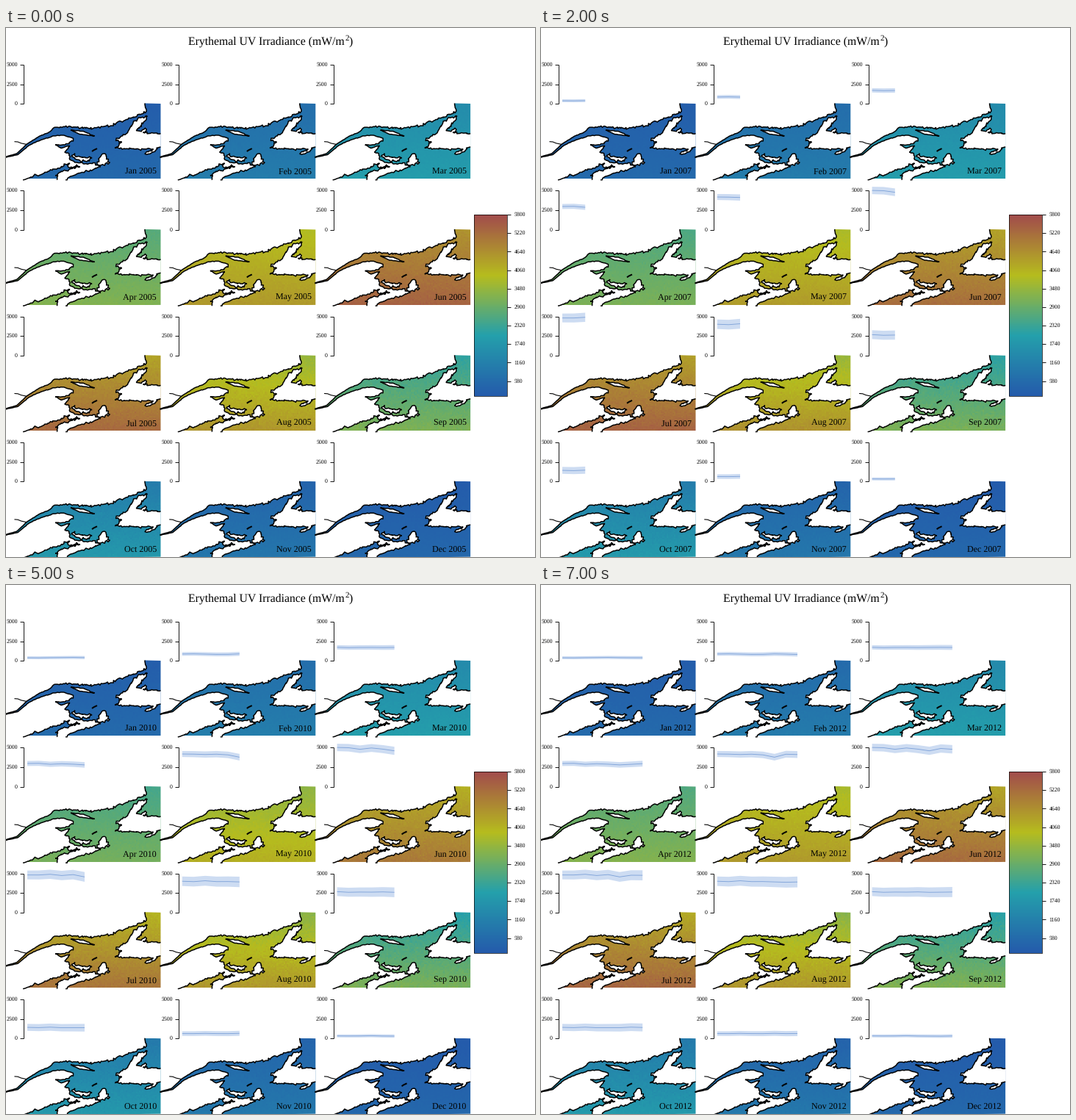
These frames come from a looping animation (720x720 px, 8 s). A matplotlib script:

```python
import numpy as np
import matplotlib.pyplot as plt
from matplotlib.animation import FuncAnimation
from matplotlib.colors import LinearSegmentedColormap, Normalize
from matplotlib.patches import PathPatch, Polygon, Rectangle
from matplotlib.path import Path

plt.rcParams["font.family"] = "Liberation Serif"
plt.rcParams["text.hinting"] = "none"

SIZE = 720
YEARS = np.arange(2005, 2013)
MONTHS = "Jan Feb Mar Apr May Jun Jul Aug Sep Oct Nov Dec".split()
COL_STEP, ROW_STEP = 210.8, 171.4
RIGHT, TOP, BOTTOM = 210.5, 103, 205.5
ZERO_Y, PX_PER_UNIT = 102.6, 53.2 / 5000

ramp = [(36, 91, 171), (36, 160, 172), (182, 188, 30), (162, 76, 76)]
cmap = LinearSegmentedColormap.from_list("uv", np.array(ramp) / 255)
norm = Normalize(100, 5800)
rng = np.random.default_rng(5)


def wave(month, peak, period=12):
    return np.cos(2 * np.pi * (month - peak) / period)


def irradiance():
    """Mean and spread by month and year: a seasonal cycle with small
    random anomalies and one cloudy spring."""
    m = np.arange(12)[:, None]
    season = 2355 + 2342 * wave(m, 5.37) + 258 * wave(m, -0.56, 6)
    cloudy = 0.08 * np.exp(-2 * (YEARS - 2010) ** 2 - (m - 4.3) ** 2 / 4)
    noise = rng.normal(0, 0.012, (12, len(YEARS)))
    mean = season * (1 + noise - cloudy) + 15 * noise / 0.012
    spread = np.sqrt(season) * (9.3 + 3.2 * wave(m, 9.5))
    return mean, spread * (1 + 0.02 * (YEARS - 2007))


means, spreads = irradiance()

# Key points of the coasts as longitude west and latitude
NORTH = [(55.8, 53.15), (55.6, 52.2), (57.1, 51.42), (59, 50.85),
         (59.8, 50.4), (61.8, 50.1), (64.5, 50.3), (66.4, 50.2),
         (67.2, 49.5), (68.2, 49.1), (69.7, 48.1), (70.8, 47), (72.2, 46.57)]
SOUTH = [(72.2, 46.5), (70.7, 46.85), (69.5, 47.9), (68.5, 48.45),
         (66.7, 49.1), (65.3, 49.23), (64.2, 48.85), (64.2, 48.5),
         (65.2, 48.05), (66.3, 48.05), (65.6, 47.65), (64.6, 47.95),
         (65.2, 47.15), (64.7, 47), (64.6, 46.25), (63.6, 45.85),
         (62.7, 45.75), (61.9, 45.85), (61, 45.35), (63.4, 44.6),
         (64.5, 44.2), (65.1, 43.75)]
BAY = [(70.1, 43.75), (69, 44.1), (68.7, 44.45), (68.3, 44.25), (67, 44.85),
       (66, 45.2), (64.6, 45.8), (64.8, 45.35), (63.4, 45.38),
       (64.3, 45.15), (65.7, 44.7), (66.3, 44.3), (66, 44.3), (66.1, 43.75)]
EAST = [(53.9, 49.45), (55.3, 49.45), (56, 49.6), (55.6, 49.95),
        (56.8, 49.8), (55.9, 50.9), (55.5, 51.55), (56.5, 51.4),
        (57.2, 50.65), (57.8, 49.6), (58.8, 48.85), (59.2, 48.55),
        (58.5, 48.4), (59.3, 47.65), (56, 47.55), (54.8, 47.55),
        (55.8, 46.95), (55.2, 46.95), (53.9, 47.8)]
ISLANDS = [
    [(64.5, 49.87), (63, 49.72), (61.7, 49.15), (63.4, 49.35)],
    [(64, 47), (63.9, 46.6), (62, 46.45), (62.6, 46), (63.8, 46.25), (64.4, 46.65)],
    [(60.5, 47), (60.3, 46.3), (59.9, 45.9), (61, 45.55), (61.4, 45.7), (61, 46.6)],
]
ISLETS = [(62, 47.25), (61.8, 47.4), (61.4, 47.6)]
INLET = [(71.1, 48.45), (70.7, 48.42), (70.3, 48.25), (69.7, 48.12)]


def project(points):
    west, lat = np.transpose(points)
    return np.column_stack([88 + 11.6 * (64.5 - west), 143 + 11.1 * (49.5 - lat)])


def coastline(points, amp):
    """Subdivide a chain and jitter it, calm in the west, ragged in the east."""
    pts = project(points)
    out = [pts[0]]
    for a, b in zip(pts[:-1], pts[1:]):
        n = max(1, int(np.hypot(*(b - a)) / 2))
        for k in range(1, n + 1):
            p = a + (b - a) * k / n
            rough = amp * np.clip((p[0] - 30) / 90, 0.15, 1)
            out.append(p + (rng.normal(0, rough, 2) if k < n else 0))
    out = np.array(out)
    out[:, 0] = np.minimum(out[:, 0], RIGHT)
    return out


north = coastline(NORTH, 0.9)
south = coastline(SOUTH, 0.9)
bay = coastline(BAY, 1.6)
east = coastline(EAST, 0.9)
islands = [coastline(p + p[:1], amp) for p, amp in zip(ISLANDS, (0.3, 1, 1))]
sea = np.vstack([north, south, [(RIGHT, BOTTOM), (RIGHT, TOP)]])

fig = plt.figure(figsize=(SIZE / 72, SIZE / 72), dpi=72, facecolor="white")
ax = fig.add_axes([0, 0, 1, 1])
ax.axis("off")


def stroke(pts, width=1.5, color="black"):
    x, y = np.transpose(pts)
    return ax.plot(x, y, color=color, lw=width, solid_joinstyle="miter",
                   solid_capstyle="butt")[0]


def label(x, y, text, size, align="left"):
    return ax.text(x, y, text, fontsize=size, ha=align, va="baseline", zorder=5)


def field(month, i):
    """Colours of the sea: stronger to the south, with a fine grain."""
    y, x = np.mgrid[0:1:51j, 0:1:105j]
    grain = np.random.default_rng(100 * i + month).normal(0, 0.1, x.shape)
    tilt = 1.7 * (y - 0.45) - 0.1 * (x - 0.5) + grain
    return cmap(norm(means[month, i] + spreads[month, i] * tilt))


class Panel:
    def __init__(self, month):
        row, col = divmod(month, 3)
        self.month = month
        self.shift = np.array([col * COL_STEP, row * ROW_STEP])
        self.draw_map()
        self.draw_axis()
        self.band = ax.add_patch(Polygon([(0, 0)] * 3, fc="#cddcf2", lw=0))
        self.line = stroke([(0, 0)], 0.9, "#7fa3d9")
        # Names with a descender sit a little higher
        drop = 1.5 if MONTHS[month][-1] in "gpy" else 0
        x, y = self.shift + (205, 199.3 - drop)
        self.name = label(x, y, "", 12, "right")

    def draw_map(self):
        dx, dy = self.shift
        water = Path.make_compound_path(
            Path(sea + self.shift), Path(bay + self.shift))
        self.image = ax.imshow(
            field(self.month, 0), aspect="auto", interpolation="nearest",
            extent=(dx, dx + RIGHT, dy + BOTTOM, dy + TOP), zorder=1)
        self.image.set_clip_path(PathPatch(water, transform=ax.transData))
        for land in [east] + islands:
            ax.add_patch(Polygon(land + self.shift, fc="white", lw=0, zorder=1.5))
        for coast in [north, south, bay, east] + islands:
            stroke(coast + self.shift)
        stroke(project(INLET) + self.shift, 1.1)
        stroke(project(ISLETS) + self.shift, 2)

    def draw_axis(self):
        x = self.shift[0] + 24
        base = self.shift[1] + ZERO_Y
        stroke([(x, base + 0.5), (x, base - 52.7)], 0.9)
        for value in (0, 2500, 5000):
            y = base - value * PX_PER_UNIT
            stroke([(x - 5, y + 0.5), (x, y + 0.5)], 0.9)
            label(x - 8, y + 2.6, str(value), 7.8, "right")

    def update(self, i):
        m = self.month
        mean, spread = means[m, :i + 1], spreads[m, :i + 1]
        x = self.shift[0] + 29 + 15.6 * np.arange(i + 1)
        base = self.shift[1] + ZERO_Y
        low = base - (mean - spread) * PX_PER_UNIT
        high = base - (mean + spread) * PX_PER_UNIT
        self.band.set_xy(np.column_stack(
            [np.r_[x, x[::-1]], np.r_[high, low[::-1]]]))
        self.line.set_data(x, base - mean * PX_PER_UNIT)
        self.image.set_data(field(m, i))
        self.name.set_text(f"{MONTHS[m]} {YEARS[i]}")


def draw_title():
    label(461, 23, "Erythemal UV Irradiance (mW/m", 15.75, "right")
    label(461.3, 17, "2", 11)
    label(472, 23, ")", 15.75, "right")


def draw_colorbar():
    colors = cmap(np.linspace(1, 0, 247))[:, None]
    ax.imshow(colors, aspect="auto", extent=(637, 682, 501, 254))
    ax.add_patch(Rectangle((637, 254), 45, 247, fill=False, lw=0.7))
    for k in range(1, 11):
        y = 505.3 - 25.18 * k
        stroke([(682, y + 0.5), (687, y + 0.5)], 0.9)
        label(691.5, y + 2.6, str(580 * k), 7.8)


panels = [Panel(m) for m in range(12)]
draw_title()
draw_colorbar()
ax.set(xlim=(0, SIZE), ylim=(SIZE, 0))


def update(i):
    for panel in panels:
        panel.update(i)


anim = FuncAnimation(fig, update, frames=len(YEARS), interval=1000,
                     init_func=lambda: update(0), repeat=True, repeat_delay=0)
plt.show()
```
